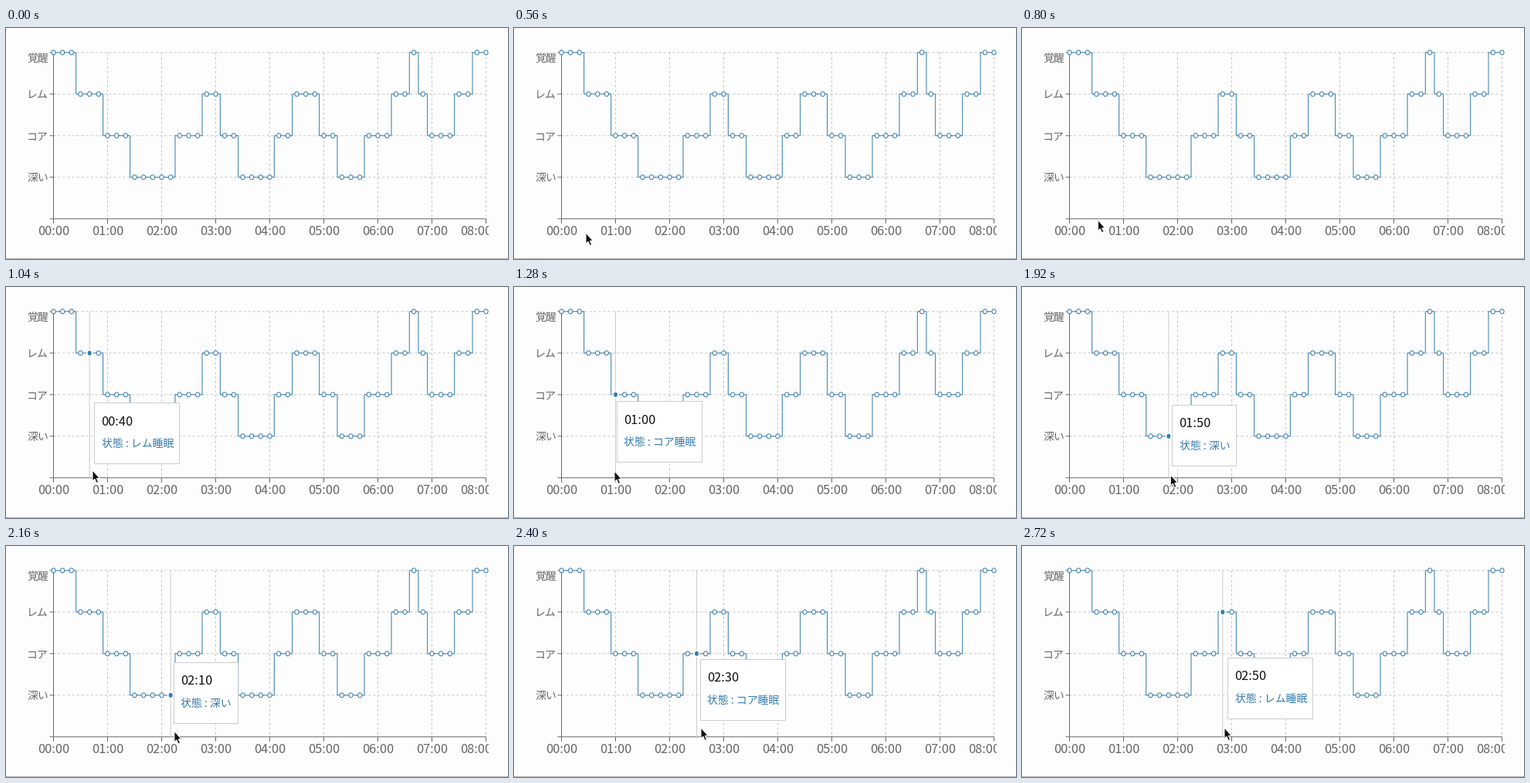
A matplotlib script that plays this animation: 650 by 300 pixels, repeating every 2800 ms.

```python
import numpy as np
import matplotlib.pyplot as plt
from matplotlib.animation import FuncAnimation
from matplotlib.patches import Ellipse, Polygon, Rectangle

W, H, DPI = 650, 300, 100
FRAMES, INTERVAL = 35, 80
PX = 72 / DPI

BG, BLUE, GRAY, GRID = "#fdfdfd", "#357bab", "#666666", "#c4c4c4"
FONT = "Noto Sans CJK JP"
NUM_SIZE, JP_SIZE = 16.4, 13.9

LEFT, RIGHT, TOP, BOTTOM = 61.5, 621.5, 31.8, 247.8
STEP, ROW = (RIGHT - LEFT) / 48, (BOTTOM - TOP) / 4

AXIS_NAMES = ["覚醒", "レム", "コア", "深い"]
TIP_NAMES = ["覚醒", "レム睡眠", "コア睡眠", "深い"]

# The night walks one stage at a time between these turning points
# (0 awake ... 3 deep); each digit is a stay in ten-minute samples.
TURNS = [0, 3, 1, 3, 1, 3, 0, 2, 0]
STAYS = "3335322423233211322"

TIP_H, TIP_DX, TIP_DY, EASE = 79, 8.5, 90, 0.55


def sleep_stages():
    walk = [TURNS[0]]
    for goal in TURNS[1:]:
        while walk[-1] != goal:
            walk.append(walk[-1] + (1 if goal > walk[-1] else -1))
    return np.repeat(walk, [int(c) for c in STAYS])


stages = sleep_stages()
xs = LEFT + STEP * np.arange(len(stages))
ys = TOP + ROW * stages

# Pointer key points: frame, x, y
KEYS = np.array([(5, 92, 296), (7, 93, 266), (11, 101, 245), (13, 112, 238),
                 (16, 130, 239), (24, 192.3, 244), (30, 242, 236),
                 (34, 262, 236)])


def pointer(i):
    """Cubic spline through the key points, at rest at both ends."""
    t, p = KEYS[:, 0], KEYS[:, 1:]
    slope = np.zeros_like(p)
    slope[1:-1] = (p[2:] - p[:-2]) / (t[2:] - t[:-2])[:, None]
    k = min(np.searchsorted(t, i, side="right") - 1, len(t) - 2)
    h = t[k + 1] - t[k]
    u = (i - t[k]) / h
    mix = u * u * (3 - 2 * u)
    return (p[k] * (1 - mix) + p[k + 1] * mix
            + h * u * (1 - u) * (slope[k] * (1 - u) - slope[k + 1] * u))


fig = plt.figure(figsize=(W / DPI, H / DPI), dpi=DPI, facecolor=BG)
ax = fig.add_axes([0, 0, 1, 1])
ax.set_xlim(0, W)
ax.set_ylim(H, 0)
ax.axis("off")


def line(x, y, color, width=1, **kw):
    return ax.plot(x, y, color=color, lw=width * PX, snap=False,
                   solid_capstyle="butt", **kw)[0]


def text(x, y, s, size, color, ha="left", z=5):
    return ax.text(x, y, s, fontsize=size * PX, color=color, ha=ha,
                   va="baseline", family=FONT, zorder=z)


def dot(x, y, rx, ry, face, edge, width, z):
    return ax.add_patch(Ellipse((x, y), 2 * rx, 2 * ry, facecolor=face,
                                edgecolor=edge, lw=width * PX, zorder=z))


def draw_chart():
    dash = dict(ls=(0, (3, 3)), zorder=1)
    for i, name in enumerate(AXIS_NAMES):
        y = TOP + ROW * i
        line([LEFT, RIGHT], [y, y], GRID, **dash)
        line([56.5, LEFT], [y, y], GRAY, zorder=2)
        # the top label is pushed down to stay inside the chart
        text(55, max(y + 5.5, 44), name, JP_SIZE, GRAY, "right")
    for hour in range(9):
        x = LEFT + 6 * STEP * hour
        if hour:
            line([x, x], [TOP, BOTTOM], GRID, **dash)
        line([x, x], [BOTTOM, BOTTOM + 6], GRAY, zorder=2)
        label = text(min(x, 609), 269, f"{hour:02d}:00", NUM_SIZE, GRAY,
                     "center")
        label.set_clip_path(Rectangle((0, 0), 625, H, transform=ax.transData))
        label.set_clip_on(True)
    line([56.5, RIGHT], [BOTTOM, BOTTOM], GRAY, zorder=2)
    line([LEFT, LEFT], [TOP, BOTTOM], GRAY, zorder=2)
    line([0, W], [H - 0.5, H - 0.5], "#b4b4b4", zorder=2)

    line(xs, ys, BLUE, drawstyle="steps-mid", zorder=4)
    for x, y in zip(xs, ys):
        dot(x, y, 2.6, 3, "white", BLUE, 1, 5)


def plan():
    """Per frame: pointer, hovered sample and the lagging tooltip corner."""
    states, corner = [], None
    for i in range(FRAMES):
        if i < KEYS[0, 0]:
            states.append((None, None, None))
            continue
        tip, hover = pointer(i), None
        if tip[1] < BOTTOM:
            hover = int(round((tip[0] - LEFT) / STEP))
            goal = np.array([xs[hover] + TIP_DX, tip[1] - TIP_DY])
            corner = goal if corner is None else corner + EASE * (goal - corner)
        states.append((tip, hover, corner))
    return states


draw_chart()
STATES = plan()

guide = line([0, 0], [TOP, BOTTOM], "#cccccc", zorder=3)
active = dot(0, 0, 3.4, 4, BLUE, "white", 1.8, 6)
box = ax.add_patch(Rectangle((0, 0), 110, TIP_H, facecolor="white",
                             edgecolor="#cccccc", lw=PX, snap=False, zorder=7))
title = text(0, 0, "", NUM_SIZE, "#111111", z=8)
body = text(0, 0, "", JP_SIZE, BLUE, z=8)
ARROW = np.array([(0, 0), (0, 14.2), (3, 11.4), (5.2, 16.6), (7.6, 15.5),
                  (5.4, 10.5), (9.3, 10.3)])
arrow = ax.add_patch(Polygon(ARROW, closed=True, facecolor="#111111",
                             edgecolor="white", lw=PX, zorder=10))
HOVER_PARTS = (guide, active, box, title, body)


def update(i):
    tip, hover, corner = STATES[i]
    arrow.set_visible(tip is not None)
    for part in HOVER_PARTS:
        part.set_visible(hover is not None)
    if tip is not None:
        arrow.set_xy(ARROW + tip)
    if hover is not None:
        x, y = np.floor(corner) + 0.5
        name = TIP_NAMES[stages[hover]]
        guide.set_xdata([xs[hover]] * 2)
        active.set_center((xs[hover], ys[hover]))
        box.set_xy((x, y))
        box.set_width(56 + 13.5 * len(name))
        title.set_text(f"{hover // 6:02d}:{hover % 6 * 10:02d}")
        title.set_position((x + 8.5, y + 29))
        body.set_text(f"状態 : {name}")
        body.set_position((x + 9, y + 57.5))
    return (*HOVER_PARTS, arrow)


anim = FuncAnimation(fig, update, frames=FRAMES, interval=INTERVAL,
                     repeat=True, repeat_delay=0, blit=False)
plt.show()
```
